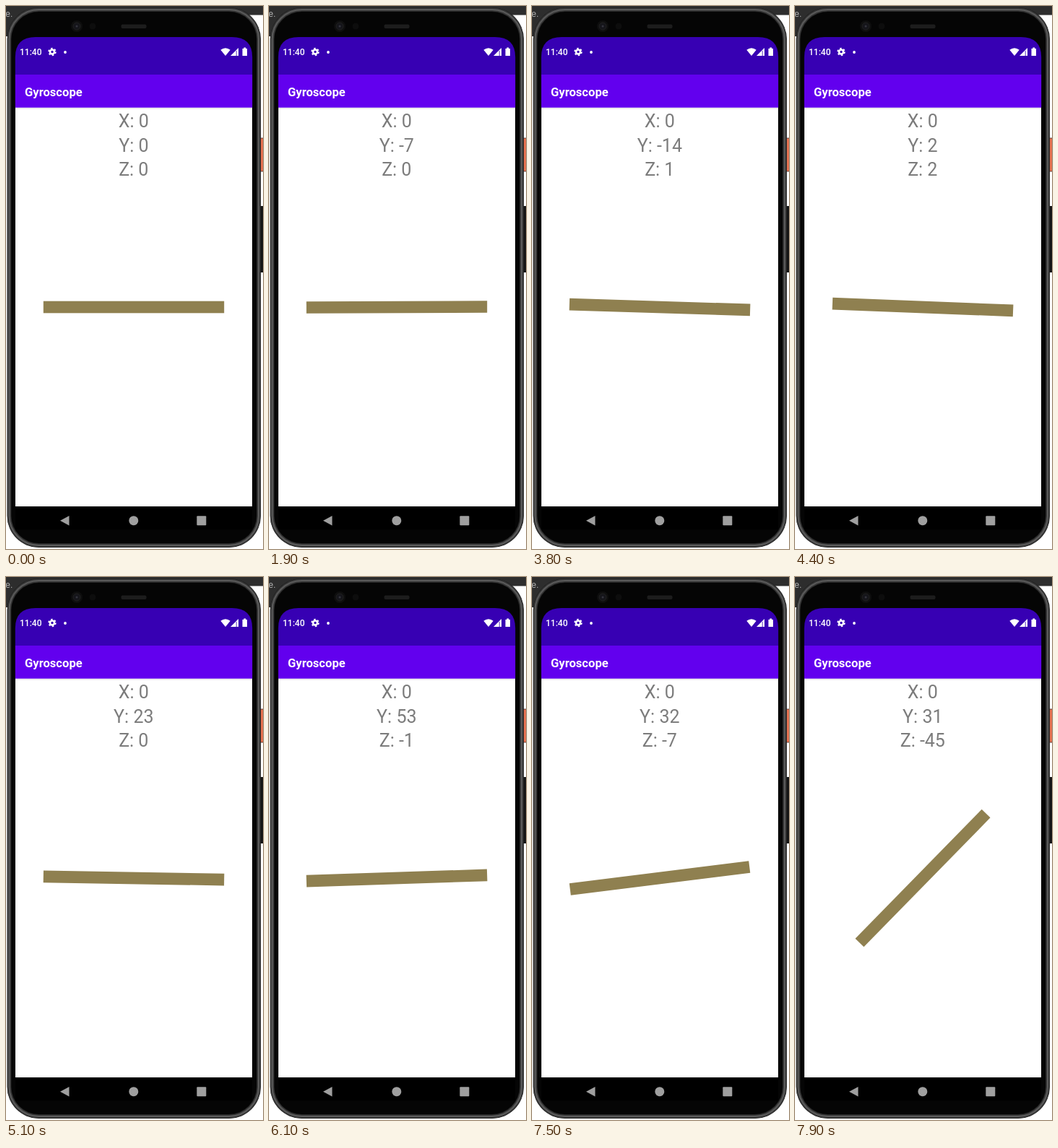
Recreate the animation shown at these times as an HTML page. Size 356x752 px, loop 8 s.

```html
<!DOCTYPE html>
<html lang="en">
<head>
<meta charset="utf-8">
<title>Gyroscope</title>
<style>
  html, body { margin: 0; width: 100%; height: 100%; overflow: hidden; background: #fff; }
  svg { display: block; width: 100vw; height: 100vh; }
  text { font-family: Roboto, sans-serif; }
  .read { font-size: 25px; fill: #7c7c7c; text-anchor: middle; }
</style>
</head>
<body>
<svg viewBox="0 0 356 752" preserveAspectRatio="none">
  <defs>
    <linearGradient id="shade" x1="0" x2="0" y1="0" y2="1">
      <stop offset="0" stop-color="#000" stop-opacity=".12"/>
      <stop offset="1" stop-color="#000" stop-opacity="0"/>
    </linearGradient>
  </defs>

  <!-- desktop behind the phone -->
  <rect width="356" height="752" fill="#fff"/>
  <rect width="356" height="12.500" fill="#2d2d2d"/>
  <rect width="30" height="42" fill="#2d2d2d"/>
  <text x="-1" y="15" font-size="13" fill="#a9a9a9">e.</text>

  <!-- phone -->
  <rect x="351" y="183" width="6" height="46" fill="#e2704f" stroke="#3a2420" stroke-width=".8"/>
  <rect x="351" y="277" width="6" height="92" rx="1" fill="#151515"/>
  <g fill="none">
    <rect x="1.500" y="2" width="351.500" height="748" rx="44" fill="#191919"/>
    <rect x="4.500" y="5" width="345.500" height="742" rx="41" stroke="#363636" stroke-width="5"/>
    <rect x="4.500" y="5" width="345.500" height="742" rx="41" stroke="#5a5a5a" stroke-width="2"/>
    <rect x="7.500" y="8" width="339.500" height="736" rx="38" fill="#050505"/>
  </g>
  <circle cx="98" cy="28" r="8" fill="#0e0e0e"/>
  <circle cx="98" cy="28" r="5" fill="#15151a" stroke="#202020"/>
  <circle cx="98" cy="28" r="1.500" fill="#34343d"/>
  <circle cx="120" cy="28" r="4.500" fill="#0d0d0d"/>
  <rect x="159.500" y="25.500" width="35" height="5.500" rx="2" fill="#1d1d1d"/>

  <!-- screen -->
  <path d="M12.800 95V71Q12.800 43 41 43H313Q341.200 43 341.200 71V95Z" fill="#3700b3"/>
  <rect x="13" y="140" width="328" height="553" fill="#fff"/>
  <rect x="13" y="140.700" width="328" height="3" fill="url(#shade)"/>
  <rect x="12.800" y="95" width="328.400" height="45.700" fill="#6200ee"/>
  <rect x="13" y="693" width="328" height="32" fill="#000"/>

  <!-- status bar -->
  <g fill="#fff">
    <text x="19" y="68.300" font-size="12" font-weight="500">11:40</text>
    <circle cx="64" cy="63.500" r="3" fill="none" stroke="#fff" stroke-width="2.600"/>
    <circle cx="64" cy="63.500" r="4.800" fill="none" stroke="#fff" stroke-width="1.800" stroke-dasharray="2.500 2.527"/>
    <circle cx="82" cy="64" r="1.900"/>
    <path d="M304 69L297.300 60.800Q304 55.600 310.700 60.800Z"/>
    <path d="M311 69L322 58V69Z"/>
    <path d="M319.200 62V69" stroke="#3700b3" stroke-width=".8"/>
    <path d="M327.500 59H329.300V57.500H332.200V59H334V69H327.500Z"/>
    <text x="26" y="125" font-size="16.600" font-weight="700">Gyroscope</text>
  </g>

  <!-- navigation -->
  <g fill="#9f9f9f">
    <path d="M75 712.800L87.500 706V719.600Z"/>
    <circle cx="176.800" cy="712.700" r="6.500"/>
    <rect x="264.300" y="706.300" width="13" height="13" rx="1"/>
  </g>

  <text class="read" x="176.800" y="168.200">X: 0</text>
  <text class="read" id="y" x="176.800" y="201.700"></text>
  <text class="read" id="z" x="176.800" y="235.200"></text>
  <rect id="bar" x="51.800" y="408.700" width="250.400" height="16.600" fill="#8f8050"/>
</svg>
<script>
  const LOOP = 8000, STEP = 100;
  // [time in ms, degrees]
  const pitch = [[1800, 0], [1900, -7], [2600, -36], [3100, -33], [4400, 2], [6100, 53], [7500, 32], [7900, 31]];
  const roll = [[1800, 0], [1900, -0.2], [2500, 1.9], [3100, 1.25], [4400, 2.25], [5300, 0.6],
    [6100, -1.9], [7000, -3.2], [7500, -7.1], [7600, -12.5], [7700, -21], [7800, -32], [7900, -45.6]];
  const get = id => document.getElementById(id);
  const yText = get('y'), zText = get('z'), bar = get('bar');

  function sample(keys, t) {
    const i = keys.findIndex(k => k[0] >= t);
    if (i === 0) return keys[0][1];
    if (i < 0) return keys[keys.length - 1][1];
    const [t0, a] = keys[i - 1], [t1, b] = keys[i];
    return a + (b - a) * (t - t0) / (t1 - t0);
  }

  const whole = v => Math.trunc(v) || 0;

  function draw(ms) {
    const t = Math.floor((ms % LOOP) / STEP) * STEP;
    const angle = sample(roll, t);
    yText.textContent = 'Y: ' + whole(sample(pitch, t));
    zText.textContent = 'Z: ' + whole(angle);
    bar.setAttribute('transform', `rotate(${angle} 177 417)`);
  }

  const start = performance.now();
  function tick() {
    draw(performance.now() - start);
    requestAnimationFrame(tick);
  }
  tick();
</script>
</body>
</html>
```
